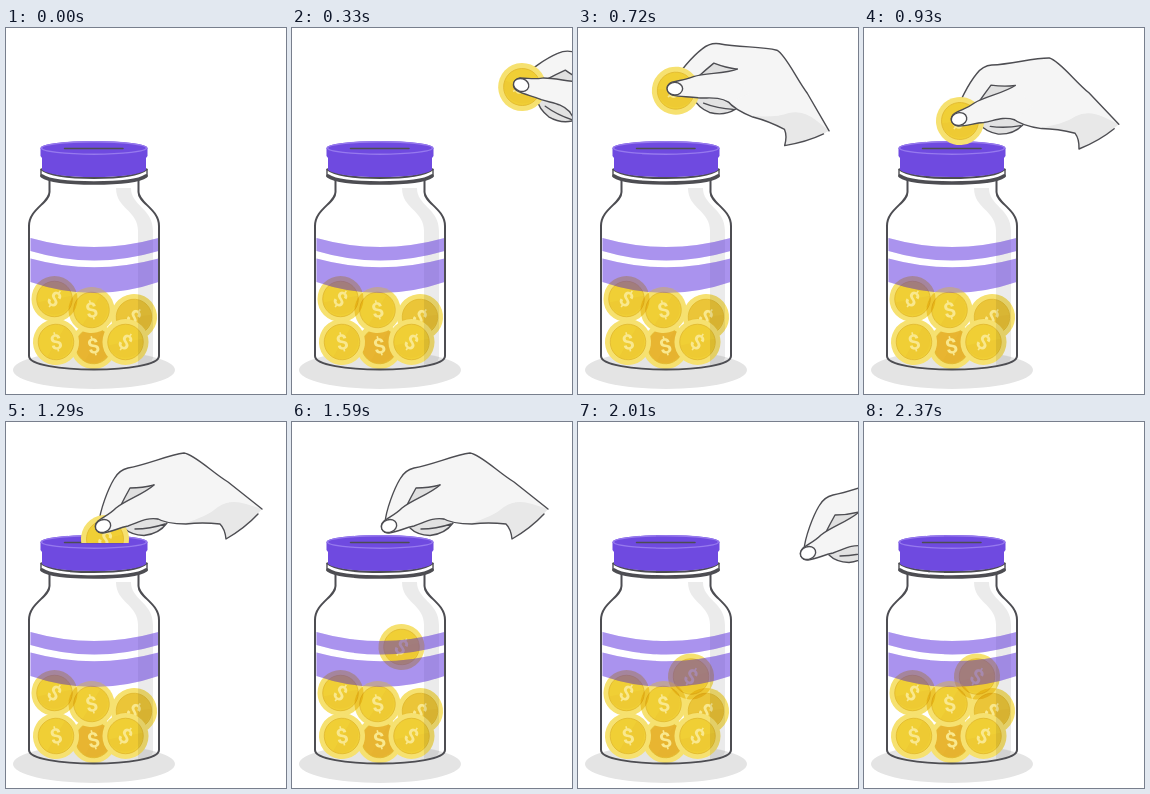
An HTML page that plays this animation: 280x366 px, repeating every 4530 ms.

```html
<!DOCTYPE html>
<html lang="en">
<head>
<meta charset="utf-8">
<title>Savings jar</title>
<style>
  html, body { margin: 0; width: 100%; height: 100%; overflow: hidden; background: #fff; }
  svg { display: block; width: 100%; height: 100%; }
  text { font: 700 22px Roboto, "Open Sans", sans-serif; text-anchor: middle; }
  .line { fill: none; stroke: #4d4d52; stroke-linecap: round; stroke-linejoin: round; }
  .thin { stroke-width: 1.4; }
  .sheer { mix-blend-mode: multiply; }
</style>
</head>
<body>
<svg viewBox="0 0 280 366">
  <defs>
    <clipPath id="above"><rect width="280" height="121"/></clipPath>
    <clipPath id="below"><rect y="126" width="280" height="240"/></clipPath>
    <clipPath id="glass"><use href="#body"/></clipPath>
    <path id="body" d="M43.500 150V164C43.500 175 23 181 23 198V328C23 346 153 346 153 328V198C153 181 132.500 175 132.500 164V150Z"/>
    <path id="bands" d="M24.500 210Q88 228 152.500 210V223Q88 242 24.500 223ZM24.500 230.500Q88 248 152.500 230.500V254Q88 276 24.500 254Z"/>
  </defs>

  <ellipse cx="88" cy="342" rx="81" ry="19" fill="#e4e4e4"/>
  <use href="#bands" fill="#d5c8f8"/>
  <g id="pile"></g>
  <g class="sheer" clip-path="url(#below)"><g id="fallen"></g></g>
  <path clip-path="url(#glass)" fill="#000" opacity=".08"
    d="M110 160H125C125 178 147 180 147 203V330Q146 336 132 339V203C132 182 110 181 110 160Z"/>
  <use href="#bands" fill="#6f4ae0" opacity=".42"/>
  <use href="#body" class="line" stroke-width="2"/>

  <g id="lid">
    <path d="M35.500 141V148Q42 156 88 156Q134 156 140.500 148V141Z" fill="#fff"/>
    <path class="line" stroke-width="3.600" d="M36 148Q46 155 88 155Q130 155 140 148"/>
    <path class="line" stroke-width="2.200" d="M35.500 141.500Q46 150 88 150Q130 150 140.500 141.500"/>
    <path class="line" stroke-width="1.400" d="M35 141.500V148M141 141.500V148"/>
    <path fill="#6f4ae0" d="M34.500 120H141.500V128L140 130V142Q130 149 88 149Q46 149 36 142V130L34.500 128Z"/>
    <ellipse cx="88" cy="120" rx="53.500" ry="7" fill="#6f4ae0"/>
    <ellipse cx="88" cy="120" rx="52.500" ry="6.200" fill="none" stroke="#9679ee" stroke-width="1.400"/>
    <path class="line" stroke-width="1.500" d="M58.500 120.500H117"/>
  </g>

  <g id="back">
    <path fill="#e2e2e2" d="M118 106Q124 113 138 113.500Q153 112 161 100L146 92Z"/>
    <path class="line thin" d="M118 106Q125 113 138 113.500Q153 112 161 101M129 107Q144 107 159 102"/>
    <path fill="#f5f5f5" d="M93 101C94 88 102 67 108 57Q113 48 122 46C143 42 162 33 178 31C188 32 207 51 222 60L256 87Q242 104 220 117Q219 107 214 102Q196 100 180 102Q160 102 150 96L110 105Z"/>
    <path fill="#e8e8e8" d="M176 102Q201 95 212 85Q224 77 240 82L256 87Q242 104 220 117Q219 107 214 102Q196 100 176 102Z"/>
    <path class="line thin" d="M93 101C94 88 102 67 108 57Q113 48 122 46C143 42 162 33 178 31C188 32 207 51 222 60L256 87M252 92Q239 106 220 117Q219 107 214 102Q196 100 180 102Q160 102 150 96"/>
    <path fill="#e0e0e0" d="M115 83Q119 75 124 66L148 63Q139 71 115 83Z"/>
    <path class="line thin" d="M115 83Q119 75 124 66Q137 66 148 63"/>
  </g>
  <g clip-path="url(#above)"><g id="held"></g></g>
  <g id="front">
    <path fill="#f5f5f5" d="M148 63C138 72 120 78 110 86C104 92 99 94 92 99C87 104 90 111 97 111C106 110 112 106 122 104C132 101 140 95 152 97L168 82Z"/>
    <path class="line thin" d="M148 63C138 72 120 78 110 86C104 92 99 94 92 99C87 104 90 111 97 111C106 110 112 106 122 104C132 101 140 95 152 97"/>
    <ellipse class="line thin" cx="97" cy="104" rx="7.800" ry="6.300" transform="rotate(-20 97 104)" style="fill:#fff"/>
  </g>
</svg>
<script>
const LOOP = 4530, STEP = 30;
const $ = id => document.getElementById(id);

// time, thumb x, thumb y, turn
const HAND = [
  [150, 305, 62, 40], [510, 155, 54, 31.4], [660, 98, 56, 25],
  [930, 95, 91, 8], [1260, 97, 104, 0], [1600, 97, 104, 0],
  [1740, 116, 107, 0], [2010, 230, 131, 0], [2300, 302, 143, 0]
];
// time, coin shift x, y once released
const DROP = [
  [1170, 0, 0], [1290, 1, 11], [1590, 11.5, 119], [1740, 14, 142], [1950, 15, 148.5]
];
// x, y, turn, face colour, sheer
const GOLD = "#f0cf35";
const PILE = [
  [87.5, 318, -15, "#e8b531"],
  [128, 289, 38, "#ebc538"],
  [85.5, 282, -14, GOLD],
  [48.5, 271, 34, GOLD, true],
  [50, 314, -14, GOLD],
  [119.5, 314, 34, GOLD]
];

function coin(face = GOLD) {
  return `<circle r="24" fill="#f6e170"/><circle r="18.500" fill="${face}"/>
    <path d="M-13 13A18.500 18.500 0 0 0 13-13Z" fill="#d99a20" opacity=".1"/>
    <circle r="18.500" fill="none" stroke="#e2b92f" stroke-width=".8"/>
    <text y="7.800" fill="#f9e88e">$</text>`;
}

const place = (x, y, turn, size = 1) =>
  `translate(${x} ${y}) rotate(${turn}) scale(${size})`;

// monotone cubic through the rows of a table
function sample(table, t, col) {
  const last = table.length - 1;
  if (t <= table[0][0]) return table[0][col];
  if (t >= table[last][0]) return table[last][col];
  let i = 0;
  while (t >= table[i + 1][0]) i++;
  const slope = k => (table[k + 1][col] - table[k][col]) / (table[k + 1][0] - table[k][0]);
  const tangent = k => {
    if (k === 0) return slope(0);
    if (k === last) return slope(last - 1);
    const a = slope(k - 1), b = slope(k);
    return a * b > 0 ? 2 * a * b / (a + b) : 0;
  };
  const h = table[i + 1][0] - table[i][0];
  const u = (t - table[i][0]) / h, v = 1 - u;
  return v * v * (1 + 2 * u) * table[i][col] + u * u * (3 - 2 * u) * table[i + 1][col]
    + h * u * v * (v * tangent(i) - u * tangent(i + 1));
}

function show(id, visible, transform) {
  $(id).style.display = visible ? "" : "none";
  $(id).setAttribute("transform", transform);
}

function draw(t) {
  const [x, y, turn] = [1, 2, 3].map(c => sample(HAND, t, c));
  const [dx, dy] = [1, 2].map(c => sample(DROP, t, c));
  const pose = place(x, y, turn) + " translate(-97 -104)";
  const handOn = t >= 150 && t < 2300;
  show("back", handOn, pose);
  show("front", handOn, pose);

  const free = t >= 1290;
  const cx = (free ? 98 : x + 1) + dx;
  const cy = (free ? 106 : y + 2) + dy;
  show("held", t >= 150 && cy < 146, place(cx, cy, turn + 30));
  show("fallen", free, place(cx, cy, 30, 0.96));
}

$("pile").innerHTML = PILE.map(([x, y, turn, face, sheer]) =>
  `<g class="${sheer ? "sheer" : ""}" transform="${place(x, y, turn, 0.96)}">${coin(face)}</g>`).join("");
$("held").innerHTML = $("fallen").innerHTML = coin();

const start = performance.now();
function tick() {
  const t = (performance.now() - start) % LOOP;
  draw(Math.floor(t / STEP) * STEP);
  requestAnimationFrame(tick);
}
tick();
</script>
</body>
</html>
```
